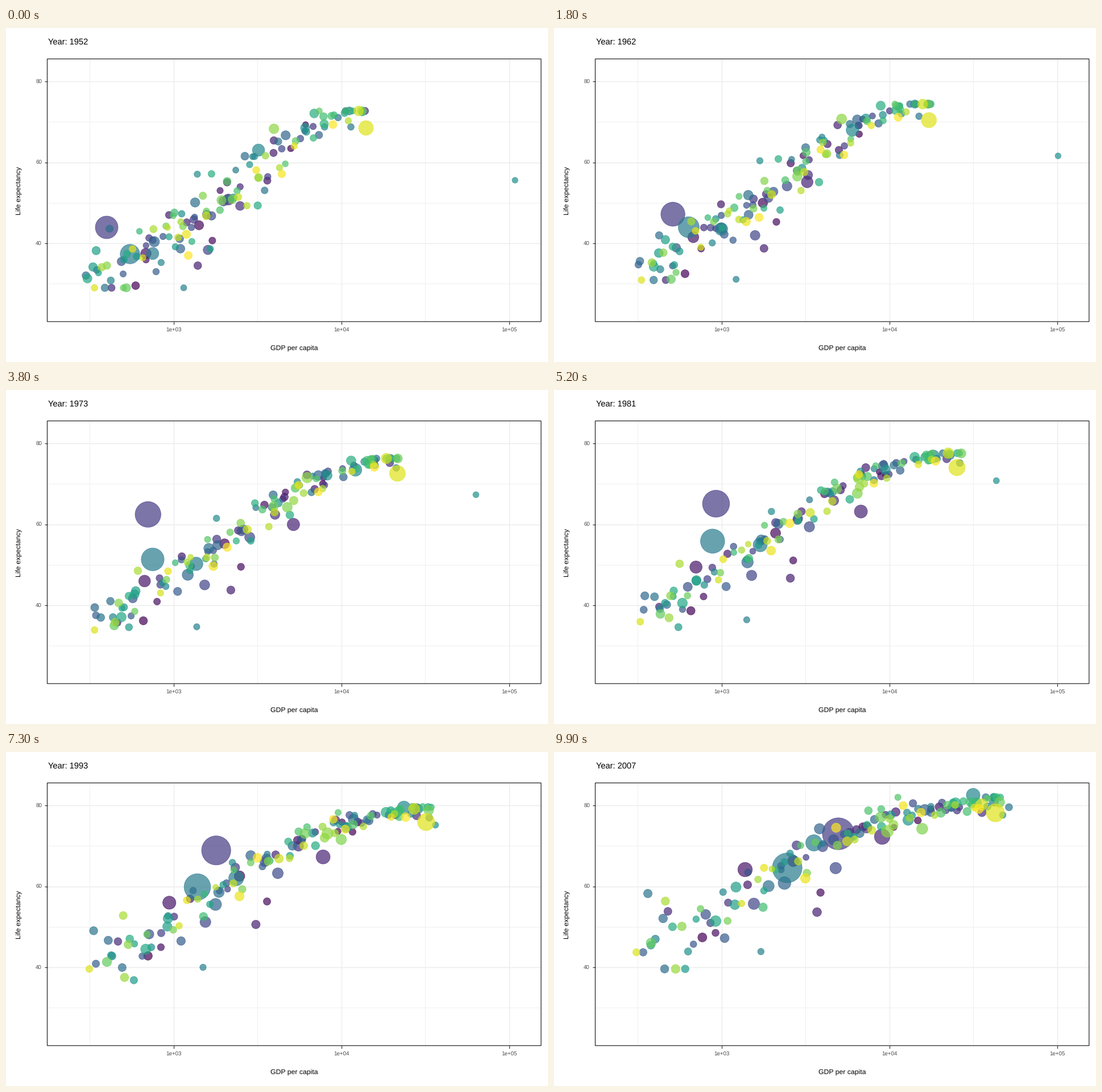
A matplotlib script that plays this animation: 953x588 px, repeating every 10000 ms.

```python
import numpy as np
import matplotlib
import matplotlib.pyplot as plt
from matplotlib.animation import FuncAnimation

W, H, DPI = 953, 588, 64
PX = 72 / DPI                      # points per pixel
FRAMES, INTERVAL = 100, 100
DOTS, KEYS = 142, 12               # one key every five years
LEFT, RIGHT, TOP, BOTTOM = 72.5, 940.8, 54.45, 516.9
plt.rcParams["font.family"] = "Liberation Sans"
plt.rcParams["text.hinting"] = "none"

rng = np.random.default_rng(11)
u = np.linspace(0, 1, KEYS)

# Largest bubbles and the lone outlier: colour rank, population (millions)
# at start and end, then points spread evenly over the loop.
LEADERS = [
    (24, 556, 1319, [(177, 351), (206, 338), (240, 226), (272, 203),
                     (342, 183), (407, 160), (500, 144)]),
    (71, .2, 2.5, [(895, 268), (883, 209), (777, 163), (752, 126),
                   (789, 111)]),
    (58, 372, 1110, [(218, 398), (270, 268), (410, 204)]),
    (134, 157, 301, [(633, 176), (705, 138), (776, 107)]),
    (66, 86, 127, [(444, 215), (666, 118), (737, 76)]),
    (14, 57, 190, [(391, 302), (540, 217), (577, 149)]),
    (8, 47, 150, [(246, 397), (243, 318), (336, 207)]),
    (59, 82, 223, [(258, 397), (457, 160)]),
]


def mix(a, b, t=u):
    return a + (b - a) * t


def to_x(log_income):
    return 294.5 + 295.3 * (log_income - 3)


def to_y(life):
    return 379 - 7.125 * (life - 40)


def crowd(n):
    """Life follows income along an S-curve that rises with time."""
    rank = (np.arange(n) + .5) / n
    later = np.argsort(np.argsort(rank + rng.normal(0, .1, n)))
    later = (later + .5) / n
    steps = np.linspace(0, 1, 5)
    first = np.interp(rank, steps, (2.47, 2.95, 3.25, 3.65, 4.15))
    last = np.interp(later, steps, (2.5, 3.2, 3.78, 4.25, 4.69))
    income = mix(first[:, None], last[:, None], u ** .9)
    income += rng.normal(0, .015, (n, KEYS))

    s = 1 / (1 + np.exp((mix(3.4, 3.3) - income) / mix(.27, .36)))
    luck = mix(rng.normal(size=(n, 1)), rng.normal(size=(n, 1)))
    behind = (abs(rank - .5) < .25) & (rng.random(n) < .12)
    life = mix(33, 41) + mix(42, 41) * s + luck * (1.2 + 5 * (1 - s))
    life += rng.normal(0, .25, (n, KEYS)) - 14 * behind[:, None]
    life = np.clip(life, mix(29, 39.6), mix(72.7, 82))

    pop = 10 ** (np.array([.6, .95]) + rng.normal(0, .5, (n, 1)))
    return np.stack([to_x(income), to_y(life)], axis=2), np.minimum(pop, 100)


path = np.zeros((DOTS, KEYS, 2))
people = np.zeros((DOTS, 2))
for rank, p0, p1, points in LEADERS:
    at = np.linspace(0, 1, len(points))
    path[rank] = np.transpose([np.interp(u, at, v) for v in zip(*points)])
    people[rank] = p0, p1
free = rng.permutation(np.flatnonzero(people[:, 0] == 0))
path[free], people[free] = crowd(len(free))

fig = plt.figure(figsize=(W / DPI, H / DPI), dpi=DPI, facecolor="white")
ax = fig.add_axes([0, 0, 1, 1])
ax.set_xlim(0, W)
ax.set_ylim(H, 0)
ax.axis("off")


def line(x, y, color, width, z):
    ax.plot(x, y, color=color, lw=width * PX, zorder=z,
            solid_capstyle="butt")


def label(x, y, text, size, color="black", **kw):
    return ax.text(x, y, text, fontsize=size * PX, color=color, **kw)


def grid(xs, ys, width):
    for x in to_x(np.array(xs)):
        line([x, x], [TOP, BOTTOM], "#ebebeb", width, 1)
    for y in to_y(np.array(ys)):
        line([LEFT, RIGHT], [y, y], "#ebebeb", width, 1)


grid([2.5, 3.5, 4.5], [30, 50, 70], .8)
grid([3, 4, 5], [40, 60, 80], 1.4)

for e in (3, 4, 5):
    x = to_x(e)
    line([x, x], [BOTTOM, BOTTOM + 5], "#333333", 1.2, 2)
    label(x, 534.5, f"1e+0{e}", 9.78, "#4d4d4d", ha="center")
for v in (40, 60, 80):
    y = to_y(v)
    line([LEFT - 5, LEFT], [y, y], "#333333", 1.2, 2)
    label(63, y + 3.5, str(v), 9.78, "#4d4d4d", ha="right")

ax.add_patch(plt.Rectangle((LEFT, TOP), RIGHT - LEFT, BOTTOM - TOP,
                           fill=False, ec="#1a1a1a", lw=1.18 * PX,
                           snap=False, zorder=4))
label(507, 567.5, "GDP per capita", 12.22, ha="center")
label(27, 286, "Life expectancy", 12.22, ha="center", va="baseline",
      rotation=90, rotation_mode="anchor")
title = label(73.5, 29, "", 14.67)

colors = matplotlib.colormaps["viridis"](np.linspace(0, 1, DOTS))
colors[:, 3] = .7
dots = ax.scatter(path[:, 0, 0], path[:, 0, 1], c=colors, edgecolors=colors,
                  linewidths=.8 * PX, zorder=3)


def draw(i):
    t = i / (FRAMES - 1)
    k = min(int(t * (KEYS - 1)), KEYS - 2)
    dots.set_offsets(mix(path[:, k], path[:, k + 1], t * (KEYS - 1) - k))
    pop = people[:, 0] ** (1 - t) * people[:, 1] ** t
    diameter = 9.7 + 46.5 * np.sqrt(pop / 1319)
    dots.set_sizes((diameter * PX) ** 2)
    title.set_text(f"Year: {round(1952 + 55 * t)}")
    return dots, title


anim = FuncAnimation(fig, draw, frames=FRAMES, interval=INTERVAL,
                     repeat=True, repeat_delay=0, blit=False)
plt.show()
```
